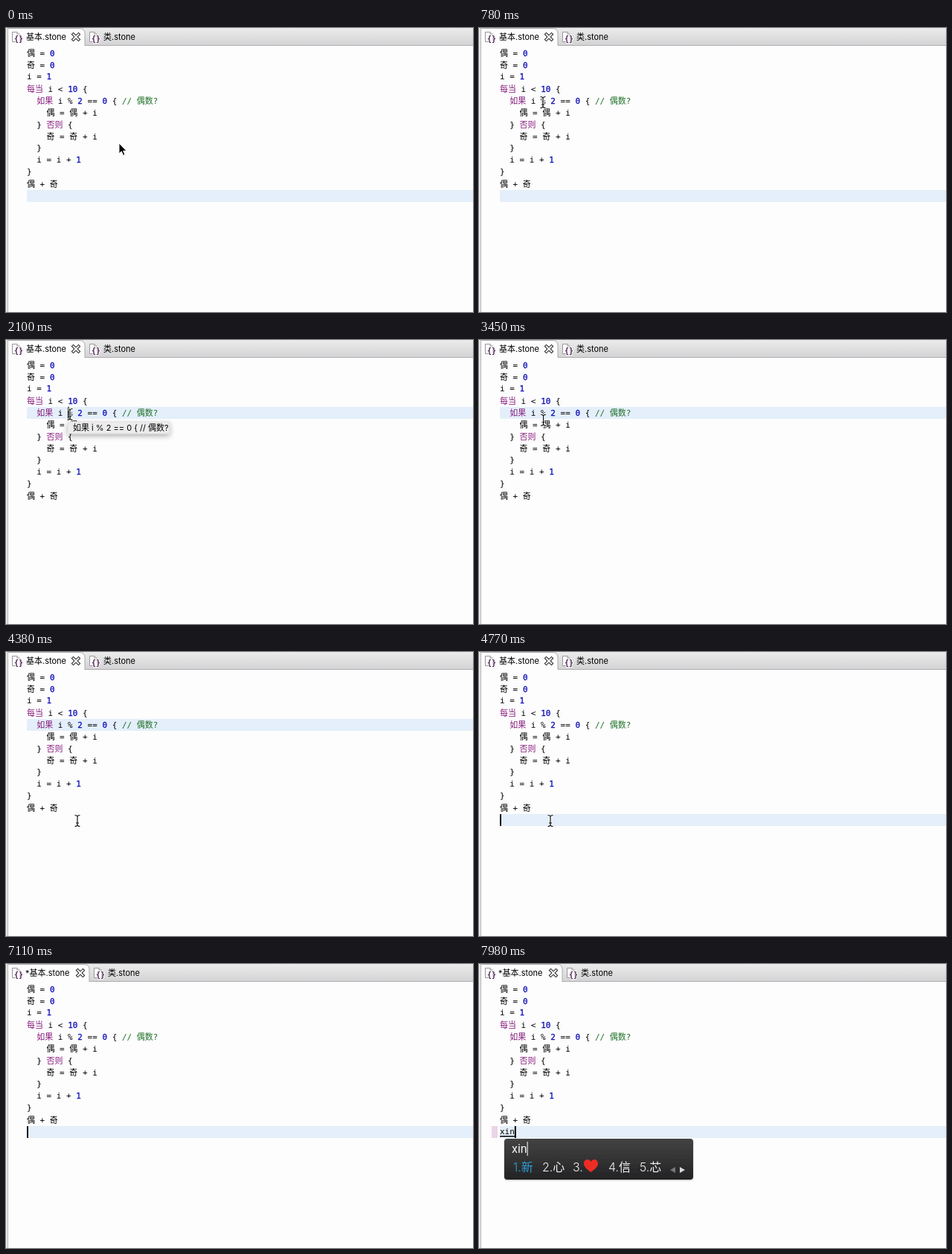
Write an HTML page that moves like this. It is 628 px wide and 382 px high and loops after 8000 ms.

```html
<!DOCTYPE html>
<html lang="zh">
<head>
<meta charset="utf-8">
<title>Editor</title>
<style>
  html, body { margin: 0; width: 100%; height: 100%; overflow: hidden; background: #fdfdfd; }
  svg { display: block; }
  text { white-space: pre; }
  .code { font: 11px "DejaVu Sans Mono", "Noto Sans CJK SC", "Noto Sans CJK", monospace; }
  .ui { font: 11px Inter, "Noto Sans CJK SC", "Noto Sans CJK", sans-serif; }
  .ime { font: 16px Inter, "Noto Sans CJK SC", "Noto Sans CJK", sans-serif; fill: #f4f4f4; }
  .ime.light { font-weight: 300; }
  #preedit { font-family: Roboto, sans-serif; }
  .brace { font: bold 10px "DejaVu Sans Mono", monospace; fill: #4a2050; stroke: #fdfdfd; stroke-width: 2px; paint-order: stroke; }
  .key { fill: #861a7c; font-weight: 500; }
  .num { fill: #1010b8; stroke: #1010b8; stroke-width: .3px; }
  .note { fill: #1f6f28; }
</style>
</head>
<body>
<svg width="628" height="382" viewBox="0 0 628 382">
  <defs>
    <linearGradient id="bar" x2="0" y2="1">
      <stop stop-color="#ececec"/><stop offset="1" stop-color="#d2d2d4"/>
    </linearGradient>
    <linearGradient id="dark" x2="0" y2="1">
      <stop stop-color="#434343"/><stop offset="1" stop-color="#232325"/>
    </linearGradient>
    <filter id="shadow" x="-10%" y="-40%" width="120%" height="220%">
      <feDropShadow dx="0" dy="3" stdDeviation="3.5" flood-color="#000" flood-opacity=".3"/>
    </filter>
    <filter id="softShadow" x="-5%" y="-20%" width="110%" height="140%">
      <feDropShadow dx="0" dy="1" stdDeviation="1" flood-color="#000" flood-opacity=".25"/>
    </filter>
    <g id="file">
      <path d="M.5 .5H7L10.5 4V13.5H.5Z" fill="#fdfdfd" stroke="#9c9698"/>
      <path d="M7 .5V4H10.5" fill="none" stroke="#9c9698"/>
      <text class="brace" x="3" y="13">{</text>
      <text class="brace" x="9" y="13">}</text>
    </g>
    <path id="beam" d="M-3.5 -7.5Q0 -7.5 0 -5V5Q0 7.5 -3.5 7.5M3.5 -7.5Q0 -7.5 0 -5M0 5Q0 7.5 3.5 7.5M-2 3H2" fill="none"/>
  </defs>

  <rect width="628" height="382" fill="#fdfdfd"/>
  <rect width="628" height="24" fill="url(#bar)"/>
  <rect width="2" height="382" fill="#e8e8e8"/>
  <path d="M2.5 0V382" stroke="#b4b4b4"/>
  <path d="M3 23.5H628" stroke="#b0b0b0"/>

  <path id="tab" fill="#fdfdfd"/>
  <path id="tabEdge" fill="none" stroke="#ababab"/>
  <use href="#file" x="8" y="5"/>
  <text id="title" class="ui" y="16"></text>
  <g id="tabRest">
    <g stroke-linecap="square">
      <path d="M90.5 8.5L97.5 15.5M97.5 8.5L90.5 15.5" stroke="#222" stroke-width="4"/>
      <path d="M90.5 8.5L97.5 15.5M97.5 8.5L90.5 15.5" stroke="#fdfdfd" stroke-width="2"/>
    </g>
    <use href="#file" x="112" y="5"/>
    <text class="ui" x="131" y="16">类.stone</text>
  </g>

  <rect id="lineMark" x="28" width="600" height="16" fill="#e4effb"/>
  <rect id="diffMark" x="17" y="218" width="8" height="16" fill="#e9d5e6"/>
  <g id="code" class="code"></g>
  <text id="typed" class="code" x="28" y="229"></text>
  <rect id="underline" x="28" y="231" height="1.5"/>
  <rect id="caret" width="2" height="16"/>

  <g id="tip">
    <rect x="83" y="110" width="137" height="16" fill="#ececec" stroke="#cfcfcf" stroke-width=".5" filter="url(#shadow)"/>
    <text class="ui" x="90" y="122">如果 i % 2 == 0 { // 偶数?</text>
  </g>

  <g id="popup">
    <rect x="34" y="235" width="254" height="55" rx="4" fill="url(#dark)" filter="url(#softShadow)"/>
    <text id="preedit" class="ime" x="44" y="254"></text>
    <rect id="preCaret" y="239" width="1" height="19" fill="#fff"/>
    <g id="choices"></g>
    <path d="M264 273V281L257 277Z" fill="#777"/>
    <path d="M270 273V281L277 277Z" fill="#d8d8d8"/>
  </g>

  <path id="arrow" d="M0 0V14L3.3 11L5.7 16.4L8 15.4L5.7 10.3H10Z" stroke="#fdfdfd"/>
  <g id="pointer">
    <use href="#beam" stroke="#fdfdfd" stroke-width="3"/>
    <use href="#beam" stroke="#111" stroke-width="1.2"/>
  </g>
</svg>

<script>
const LOOP = 8000, STEP = 30, CHAR = 6.62;
const $ = id => document.getElementById(id);
const set = (id, attrs) => {
  for (const name in attrs) $(id).setAttribute(name, attrs[name]);
};
const show = (id, on) => set(id, { visibility: on ? 'visible' : 'hidden' });
const moveTo = (id, x, y) => set(id, { transform: `translate(${x} ${y})` });
const clamp = v => Math.min(1, Math.max(0, v));

const program = [
  '偶 = 0', '奇 = 0', 'i = 1', '每当 i < 10 {',
  '  如果 i % 2 == 0 { // 偶数?', '    偶 = 偶 + i',
  '  } 否则 {', '    奇 = 奇 + i', '  }', '  i = i + 1', '}', '偶 + 奇'
];
const styled = line => line
  .replace(/</g, '&lt;')
  .replace(/(\/\/.*)|(每当|如果|否则)|(\d+)/g, (word, note, key) =>
    `<tspan class="${note ? 'note' : key ? 'key' : 'num'}">${word}</tspan>`);

$('code').innerHTML = program.map((line, row) => {
  const body = line.trimStart();
  const x = 28 + (line.length - body.length) * CHAR;
  const y = 38 + row * 16 - (/[一-龥]/.test(line) ? 0 : 1);
  return `<text x="${x}" y="${y}">${styled(body)}</text>`;
}).join('');

// Pointer stops: time, x, y
const path = [
  [0, 152, 155], [240, 86, 100], [1170, 86, 100], [1200, 92, 101],
  [1400, 95, 107], [1600, 82, 104], [1800, 86, 100],
  [3330, 86, 100], [4110, 95, 222], [4140, 95, 222], [4380, 96, 227], [LOOP, 96, 227]
];
function pointerAt(t) {
  const next = Math.max(1, path.findIndex(stop => stop[0] > t));
  const [t0, x0, y0] = path[next - 1], [t1, x1, y1] = path[next];
  const p = (t - t0) / (t1 - t0), e = p * p * (3 - 2 * p);
  return [x0 + (x1 - x0) * e, y0 + (y1 - y0) * e];
}

const caretOn = [
  [810, 1320], [1830, 2340], [2820, 3330], [3840, 4350], [4680, 4860],
  [5340, 5850], [6240, 6360], [6870, 7380], [7590, LOOP]
];

const typing = [[0, ''], [6240, 'x'], [7050, ''], [7590, 'x'], [7740, 'xi'], [7890, 'xin']];
const candidates = { x: '下小想像先', xi: '系西洗细吸', xin: '新心♥信芯' };
const slots = [46, 85, 126, 174, 216];
const heart = '<path transform="translate(141 263)" fill="#ee2c24" d="M9.5 17C4 13 0 9.5 0 5.2C0 2 2.2 0 4.9 0C7 0 8.7 1.2 9.5 3C10.3 1.2 12 0 14.1 0C16.8 0 19 2 19 5.2C19 9.5 15 13 9.5 17Z"/>';

let shownText;
function drawText(text, composing) {
  const id = text + composing;
  if (id === shownText) return;
  shownText = id;
  $('typed').textContent = text;
  set('underline', { width: composing ? text.length * CHAR : 0 });
  show('popup', composing);
  show('diffMark', text);
  if (!composing) return;
  $('preedit').textContent = text;
  $('choices').innerHTML = [...candidates[text]].map((sign, i) => {
    const isHeart = sign === '♥';
    const color = i ? '' : ' style="fill:#2a9fd8"';
    return `<text class="ime light" x="${slots[i]}" y="279"${color}>${i + 1}.${isHeart ? '' : sign}</text>` + (isHeart ? heart : '');
  }).join('');
  set('preCaret', { x: 44 + $('preedit').getComputedTextLength() });
}

function drawTabs(dirty) {
  const shift = dirty ? 6 : 0, right = 106 + shift;
  const curve = `H${right - 7}Q${right} .5 ${right} 7V24`;
  set('tab', { d: `M3 .5${curve}H3Z` });
  set('tabEdge', { d: `M3 .5${curve}` });
  set('title', { x: dirty ? 26 : 27 });
  $('title').textContent = (dirty ? '*' : '') + '基本.stone';
  moveTo('tabRest', shift, 0);
}

function draw(time) {
  const t = Math.floor(time / STEP) * STEP;
  const text = typing.filter(([start]) => start <= t).pop()[1];
  const onCondition = t >= 810 && t < 4680;
  const row = onCondition ? 4 : 12;
  const [x, y] = pointerAt(t);

  drawTabs(t >= 6240);
  drawText(text, t >= 7590);
  set('lineMark', { y: 26 + row * 16 });
  set('caret', { x: onCondition ? 83 : 28 + text.length * CHAR, y: 26 + row * 16 });
  show('caret', caretOn.some(([a, b]) => t >= a && t < b));

  set('tip', { opacity: t < 3450 ? clamp((t - 1980) / 120) : 0 });

  moveTo('arrow', x, y);
  moveTo('pointer', x, y);
  show('arrow', t < 150);
  show('pointer', t >= 150 && t < 6240);
}

const start = performance.now();
function tick() {
  draw((performance.now() - start) % LOOP);
  requestAnimationFrame(tick);
}
tick();
</script>
</body>
</html>
```
